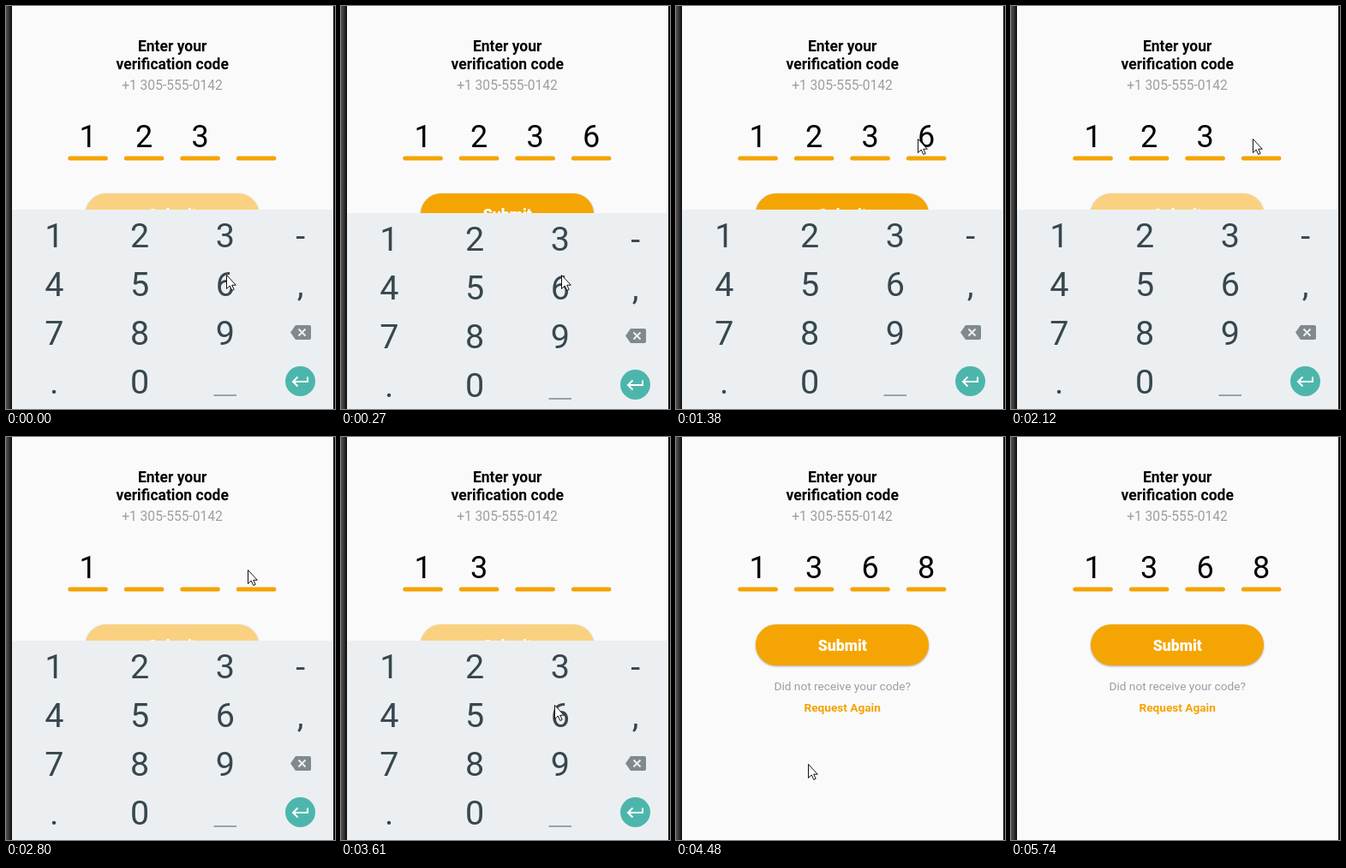
An HTML page that plays this animation: 384x471 px, repeating every 6170 ms.

```html
<!DOCTYPE html>
<html lang="en">
<head>
<meta charset="utf-8">
<title>Verification code</title>
<style>
  html, body { margin: 0; height: 100%; overflow: hidden; background: #fafafa; }
  svg { display: block; width: 384px; height: 471px; font-family: Roboto, sans-serif; text-anchor: middle; }
  .bold { font-weight: 700; }
  .grey { fill: #9e9e9e; }
  #code text { font-size: 36px; }
  #code line { stroke: #f5a302; stroke-width: 5; stroke-linecap: round; }
  #keys { font-size: 39.5px; fill: #37474f; }
  #button { filter: drop-shadow(0 1.5px 1px #0005); }
</style>
</head>
<body>
<svg viewBox="0 0 384 471">
  <defs>
    <linearGradient id="edge">
      <stop stop-color="#555"/><stop offset=".6" stop-color="#2c2c2c"/><stop offset="1" stop-color="#080808"/>
    </linearGradient>
  </defs>
  <rect width="384" height="471" fill="#fafafa"/>
  <g class="bold" font-size="17.5">
    <text x="194.2" y="53">Enter your</text>
    <text x="194.2" y="73.5">verification code</text>
  </g>
  <text class="grey" x="194" y="98" font-size="15.6">+1 305-555-0142</text>
  <g id="code"></g>
  <rect id="button" x="93" y="219" width="202" height="48" rx="24"/>
  <text x="194.3" y="250" font-size="17.7" font-weight="900" fill="#fff">Submit</text>
  <text class="grey" x="194.2" y="296" font-size="13.7">Did not receive your code?</text>
  <text class="bold" x="194.2" y="321" font-size="13.65" fill="#f5a302">Request Again</text>

  <g id="keyboard">
    <rect y="238" width="384" height="240" fill="#eceff1"/>
    <rect id="press" width="93" height="43" fill="#cfd6d9"/>
    <g id="keys"></g>
    <path d="M242.5 455H269" stroke="#99a3a8" stroke-width="2"/>
    <path d="M338 373H354q2 0 2 2V388q0 2-2 2H338L332 381.5Z" fill="#80898d"/>
    <path d="M341.5 377.5l8 8m0-8l-8 8" stroke="#eceff1" stroke-width="2"/>
    <circle cx="343.5" cy="438.5" r="17.5" fill="#4db6ac"/>
    <path d="M352 433.5V439H335.5M340.5 433.5L335 439l5.5 5.5" fill="none" stroke="#fff" stroke-width="2"/>
  </g>
  <path id="cursor" d="M.5 .5V16.5L4.2 13 6.8 18.5 9.2 17.4 6.7 12.2H11.3Z" fill="#fff" stroke="#111"/>
  <rect width="7" height="471" fill="url(#edge)"/>
  <rect x="382" width="2" height="471" fill="#111"/>
</svg>
<script>
// The screen refreshes once per tick; all times below are in ticks.
const LOOP = 6170, TICK = 140, LEAD = 20;
const strokes = [[2, "6"], [15, "<"], [17, "<"], [20, "<"], [24, "3"], [28, "6"], [31, "8"]];
const presses = { 1: 6, 27: 6, 30: 8 };
const glides = [ // start, end, x, y
  [4, 7, 282, 155], [20, 22, 251, 288], [24, 26, 247, 338], [28, 29, 154, 382],
  [32, 36, 228, 374], [36, 39, 256, 388], [39, 41, 388, 516]];

const el = id => document.getElementById(id);
const place = (node, x, y) => node.setAttribute("transform", `translate(${x} ${y})`);
const clamp = v => Math.min(1, Math.max(0, v));
const ease = v => clamp(v) ** 2 * (3 - 2 * clamp(v));

const keyX = col => 56.3 + col * 99.8 - (col == 3 ? 12 : 0);
const keyY = row => 282 + row * 57;
el("keys").innerHTML = ["123-", "456,", "789", ".0"].map((row, r) => [...row].map((key, c) =>
  `<text x="${keyX(c)}" y="${keyY(r)}">${key}</text>`).join("")).join("");

el("code").innerHTML = [0, 1, 2, 3].map(i => 95.6 + i * 65.5).map(x =>
  `<text x="${x}" y="165.3"></text><path/><line x1="${x - 20.8}" x2="${x + 20.8}" y1="178" y2="178"/>`
).join("").replaceAll("<path/>", "");
const digits = document.querySelectorAll("#code text");

const codeAt = tick => strokes.filter(([start]) => start <= tick)
  .reduce((code, [, key]) => key == "<" ? code.slice(0, -1) : code + key, "123");

function cursorAt(tick) {
  let x = 257, y = 314;
  for (const [start, end, toX, toY] of glides) {
    const k = ease((tick - start) / (end - start));
    x += (toX - x) * k;
    y += (toY - y) * k;
  }
  return [Math.round(x), Math.round(y)];
}

function draw(tick) {
  const code = codeAt(tick), key = presses[tick];
  digits.forEach((digit, i) => digit.textContent = code[i] || "");
  el("button").setAttribute("fill", code.length == 4 ? "#f5a503" : "#fad181");

  // Closes, opens and closes again, each within about one tick.
  const closed = clamp(tick - 1.87) - clamp(tick - 8.5) + clamp(tick - 30.65);
  place(el("keyboard"), 0, Math.round(260 * closed ** 2));

  el("press").style.display = key ? "" : "none";
  if (key) place(el("press"), keyX((key - 1) % 3) - 46.5, keyY(Math.floor((key - 1) / 3)) - 36);
  place(el("cursor"), ...cursorAt(tick));
}

function frame(now) {
  draw(Math.floor((now % LOOP + LEAD) / TICK));
  requestAnimationFrame(frame);
}
draw(0);
requestAnimationFrame(frame);
</script>
</body>
</html>
```
